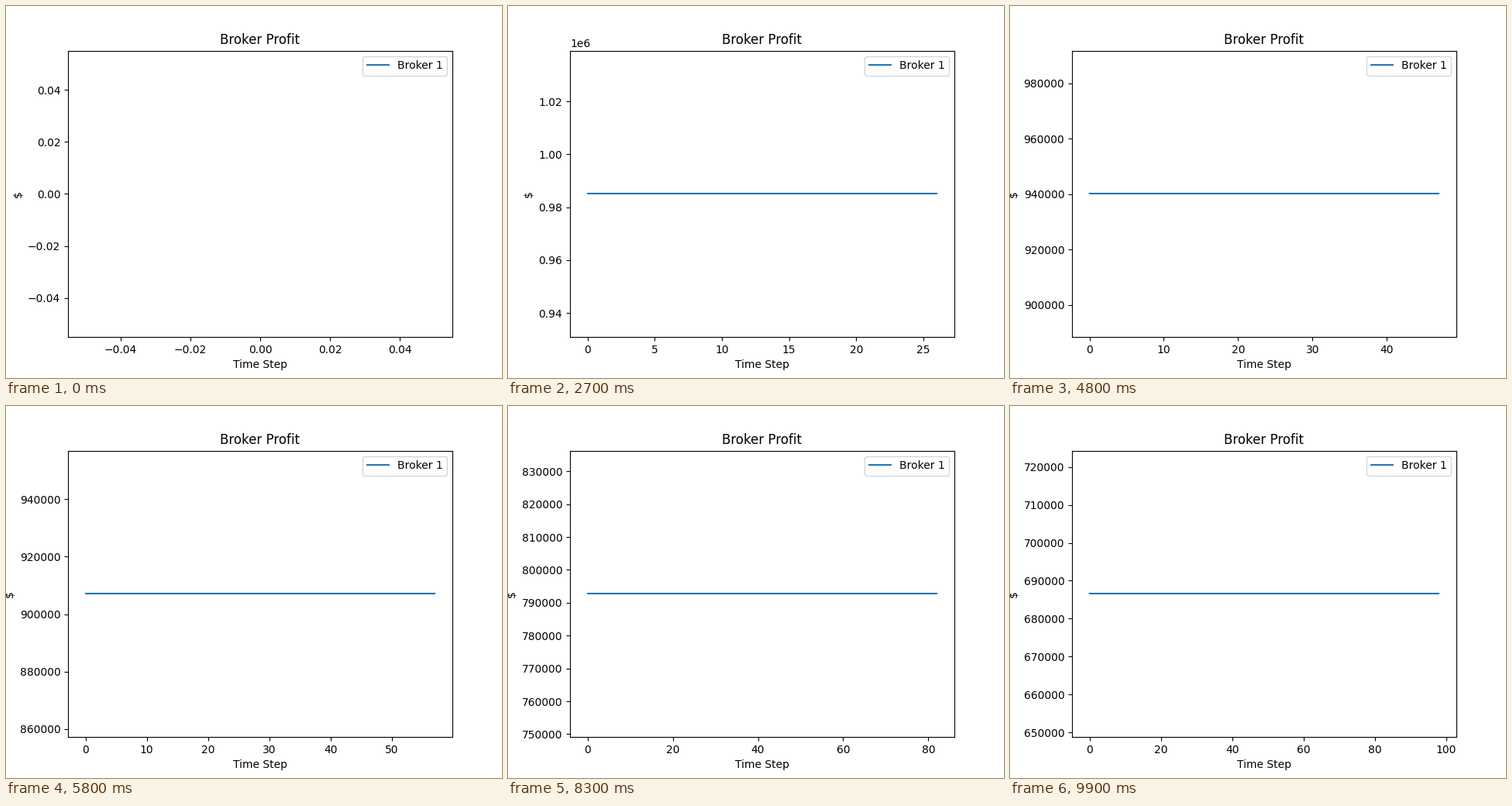
A matplotlib script that plays this animation: 640 px wide and 480 px high, repeating every 10 s.

```python
import numpy as np
import matplotlib.pyplot as plt
from matplotlib.animation import FuncAnimation

FRAMES = 100
START = 1_000_000

# The loss grows with the square of time: its root is a line with slight bends.
BENDS = [1, 17, 27, 48, 83, 99]
ROOT_LOSS = [0, 70, 122.3, 244.7, 455.3, 559.87]

fig, ax = plt.subplots(figsize=(6.4, 4.8), dpi=100)


def profit(step):
    return START - np.interp(step, BENDS, ROOT_LOSS) ** 2


def draw(step):
    """Redraw the flat balance line; the axes rescale around it."""
    ax.clear()
    ax.plot(range(step), [profit(step)] * step, color="tab:blue", label="Broker 1")
    ax.set_title("Broker Profit")
    ax.set_xlabel("Time Step")
    ax.set_ylabel("$")
    ax.legend(loc="upper right")


anim = FuncAnimation(fig, draw, frames=FRAMES, init_func=lambda: draw(0),
                     interval=100, repeat=True, repeat_delay=0)
plt.show()
```
